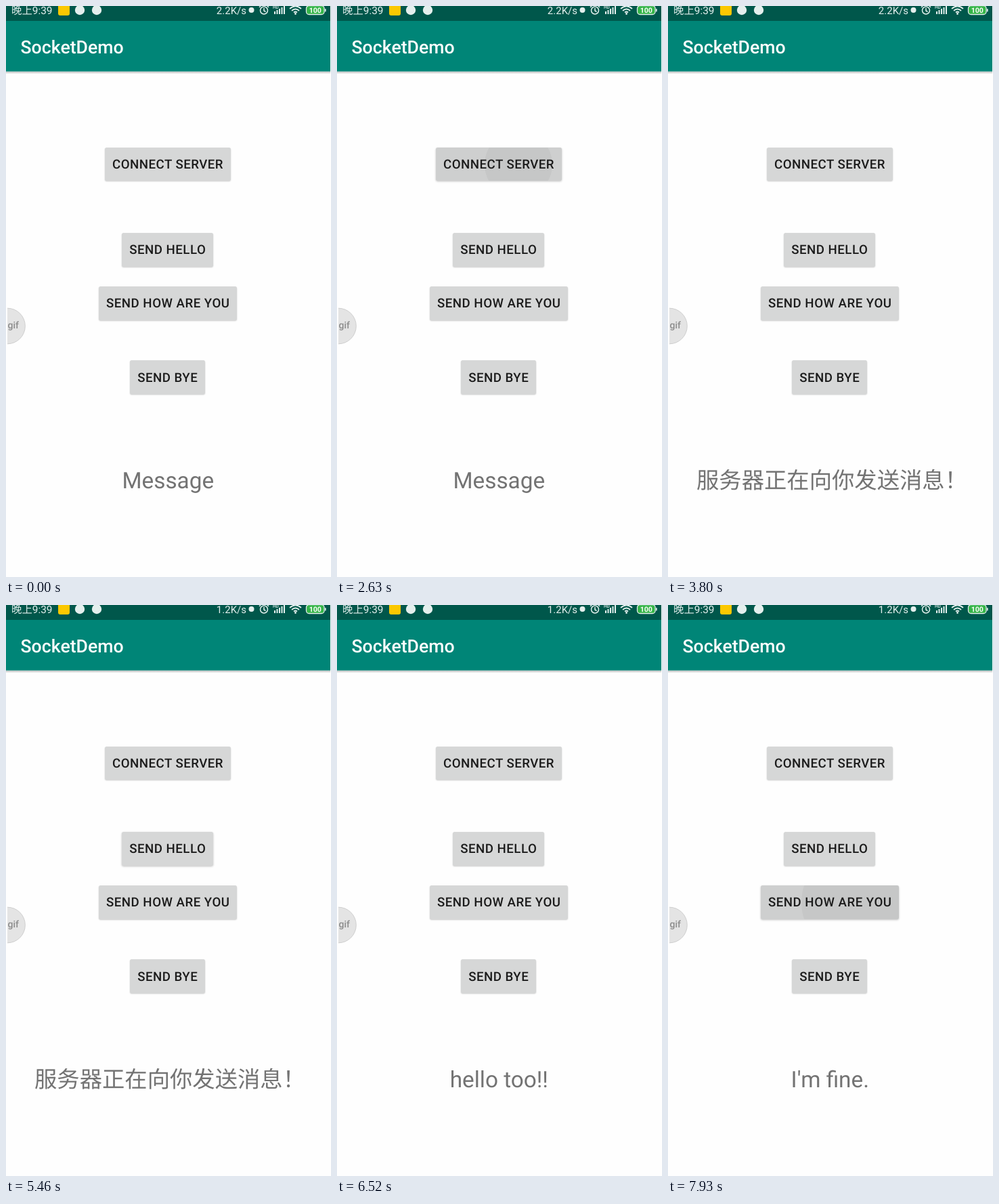
An HTML page that plays this animation: 480 px wide and 843 px high, repeating every 8000 ms.

```html
<!DOCTYPE html>
<html lang="en">
<head>
<meta charset="utf-8">
<title>SocketDemo</title>
<style>
  html, body { margin: 0; width: 100%; height: 100%; overflow: hidden; background: #fefefe; }
  body { position: relative; font-family: Roboto, "Noto Sans CJK SC", "Noto Sans CJK", sans-serif; }
  svg { position: absolute; left: 0; top: 0; }
  .button {
    position: absolute; overflow: hidden; border-radius: 2.7px; background: #d6d7d7;
    box-shadow: 0 1px 2px rgba(0,0,0,.2); color: #1b1b1b;
    font-size: 18.67px; font-weight: 500; letter-spacing: .5px;
    text-align: center; white-space: nowrap; text-rendering: geometricPrecision;
  }
  .button.pressed { box-shadow: 0 1px 3px rgba(0,0,0,.24); }
  .label { position: relative; top: 1px; left: .25px; }
  .tint, .ripple { position: absolute; background: #000; opacity: 0; }
  .tint { inset: 0; }
  .ripple { border-radius: 50%; }
</style>
</head>
<body>
<svg width="480" height="843" viewBox="0 0 480 843" text-rendering="geometricPrecision">
  <defs>
    <linearGradient id="shade" x2="0" y2="1">
      <stop stop-opacity=".26"/><stop offset="1" stop-opacity="0"/>
    </linearGradient>
    <clipPath id="edge"><path d="M2 440h40v70H2z"/></clipPath>
  </defs>

  <rect y="96.6" width="479" height="4" fill="url(#shade)"/>
  <rect width="479" height="96.6" fill="#008577"/>
  <rect width="479" height="22" fill="#00574b"/>
  <text x="21.5" y="69.8" font-size="26.67" font-weight="500" fill="#fff">SocketDemo</text>

  <!-- status bar -->
  <g fill="#e4efed" font-size="15.4">
    <text x="8" y="12">晚上9:39</text>
    <rect x="77" y="-3" width="17" height="17" rx="3" fill="#fcc800"/>
    <circle cx="109" cy="6" r="7.2"/>
    <circle cx="134" cy="6" r="7.2"/>
    <text id="speed" x="355" y="12" font-size="15" text-anchor="end"></text>
    <circle cx="362.5" cy="6" r="4"/>
    <text x="394" y="4" font-size="6.5" font-weight="500">HD</text>
    <path d="M396 8h2v4h-2zM399.5 6h2v6h-2zM403 4h2v8h-2zM406.5 2h2v10h-2zM410 -1h2v13h-2z"/>
    <g fill="none" stroke="#e4efed" stroke-width="1.5">
      <circle cx="381" cy="6.5" r="5.5"/>
      <path d="M381 3v4l2.5 1.5M374 2l3-3M388 2l-3-3"/>
      <path d="M419 4q8.5-7.5 17 0M422 7q5.5-5 11 0M425 9.5q2.5-2 5 0" stroke-width="1.7"/>
    </g>
    <circle cx="427.5" cy="11.5" r="1.4"/>
    <rect x="443.5" y="-.5" width="26.5" height="13" rx="4" fill="#35b548" stroke="#e4efed" stroke-width="1.3"/>
    <rect x="471" y="4" width="1.6" height="4.5" rx=".7"/>
    <text x="456.8" y="10.2" font-size="10.5" font-weight="700" text-anchor="middle" fill="#fff">100</text>
  </g>

  <g clip-path="url(#edge)">
    <circle cx="2" cy="472.5" r="26.3" fill="#e4e4e4" stroke="#cecece"/>
    <text x="2.5" y="476" font-size="14" font-weight="500" fill="#8c8c8c">gif</text>
  </g>

  <text id="message" y="712.3" font-size="33.33" text-anchor="middle" fill="#737373"></text>
</svg>

<script>
const LOOP = 8000, STEP = 100;

// label, left, top, width, height
const buttons = [
  ["CONNECT SERVER", 145.5, 208.5, 186.5, 49.5],
  ["SEND HELLO", 171, 335, 135, 49.5],
  ["SEND HOW ARE YOU", 137, 414, 204, 49.5],
  ["SEND BYE", 183, 523, 111, 50]
].map(makeButton);

const presses = [
  { button: 0, down: 2130, up: 3130, end: 3800, x: 122, y: 25, speed: 0.072 },
  { button: 1, down: 5460, up: 5960, end: 6520, x: 97, y: 25, speed: 0.05 },
  { button: 2, down: 7500, up: 8000, end: 8600, x: 138, y: 25, speed: 0.16 }
];

// start time, text, anchor x
const messages = [
  [0, "Message", 239.3],
  [3030, "服务器正在向你发送消息！", 242],
  [6180, "hello too!!", 239.3],
  [7860, "I'm fine.", 239.3]
];
const speeds = [[0, "2.2K/s", 355], [4610, "1.2K/s", 355]];

function makeButton([label, left, top, width, height]) {
  const box = document.createElement("div");
  box.className = "button";
  Object.assign(box.style, {
    left: left + "px", top: top + "px", width: width + "px",
    height: height + "px", lineHeight: height + "px"
  });
  const add = (tag, name) => {
    const part = box.appendChild(document.createElement(tag));
    part.className = name;
    return part;
  };
  const tint = add("div", "tint"), ripple = add("div", "ripple");
  add("span", "label").textContent = label;
  document.body.append(box);
  return { box, tint, ripple };
}

function showText(id, table, time) {
  const [, text, x] = table.findLast(([start]) => time >= start);
  const node = document.getElementById(id);
  if (node.textContent === text) return;
  node.textContent = text;
  node.setAttribute("x", x);
}

function showPress({ button, down, up, end, x, y, speed }, time) {
  const { box, tint, ripple } = buttons[button];
  const active = time >= down && time < end;
  box.classList.toggle("pressed", active && time < up);
  // the picture only refreshes about ten times a second
  const now = down + Math.floor((time - down) / STEP) * STEP;
  const released = Math.max(0, now - up);
  const strength = active ? Math.max(0, 1 - released / (end - up)) : 0;
  const radius = Math.max(0, 14 + speed * (now - down) + 0.3 * released);
  tint.style.opacity = 0.035 * strength * Math.min(1, (now - down) / 200);
  ripple.style.opacity = now > down ? 0.04 * strength : 0;
  Object.assign(ripple.style, {
    left: x - radius + "px", top: y - radius + "px",
    width: 2 * radius + "px", height: 2 * radius + "px"
  });
}

function draw() {
  const time = Math.max(0, performance.now() - start) % LOOP;
  showText("message", messages, time);
  showText("speed", speeds, time);
  presses.forEach(press => showPress(press, time));
  requestAnimationFrame(draw);
}

const start = performance.now();
draw();
</script>
</body>
</html>
```
